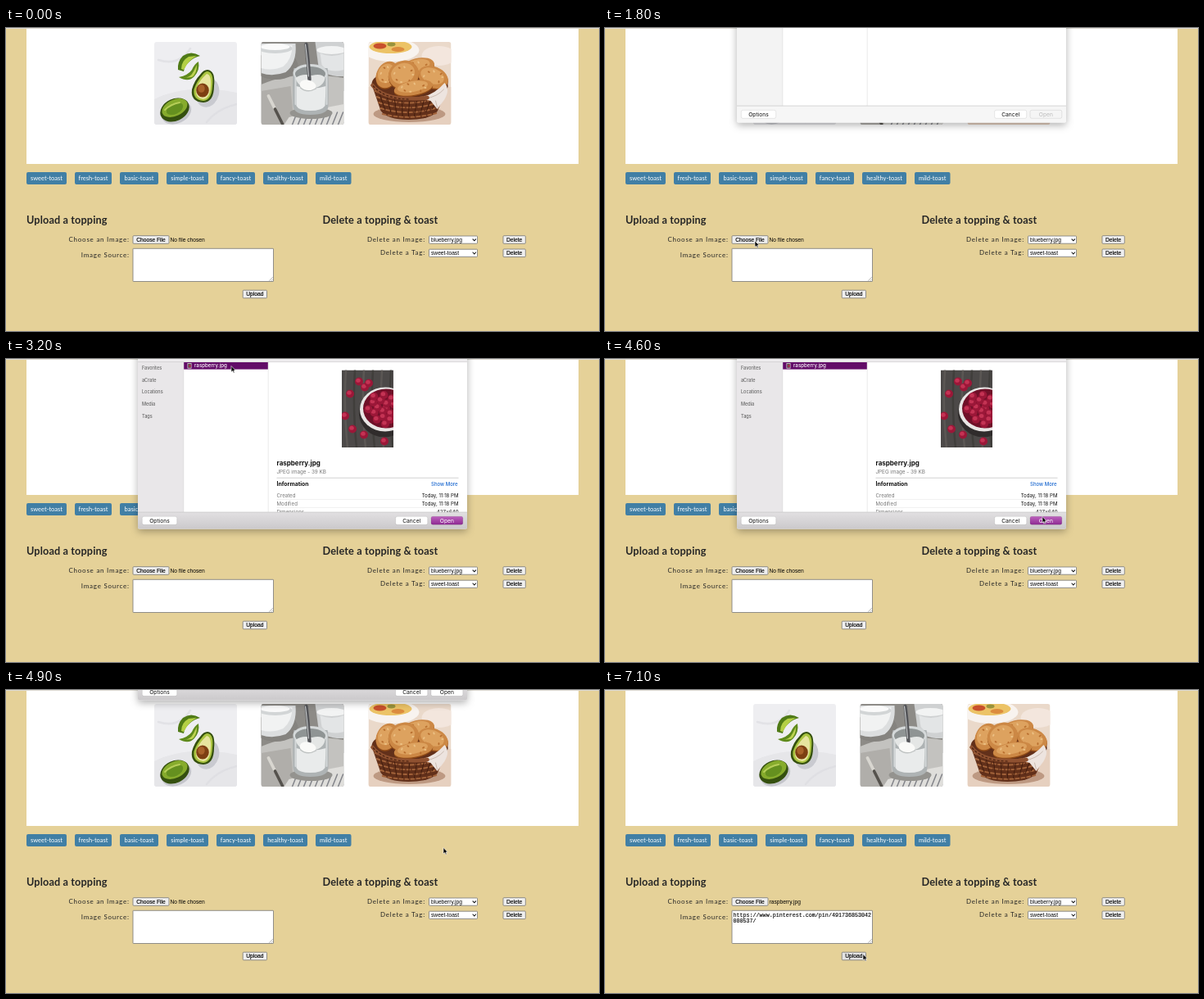
An HTML page that plays this animation: 724x370 px, repeating every 8 s.

```html
<!DOCTYPE html>
<html lang="en">
<head>
<meta charset="utf-8">
<title>Toast toppings</title>
<style>
  html, body { margin: 0; width: 100%; height: 100%; overflow: hidden; background: #e5d198; }
  svg { display: block; width: 724px; height: 370px; }
  text { white-space: pre; }
  .page { font-family: Lato, "Open Sans", sans-serif; fill: #262626; }
  .h { font-size: 12.7px; font-weight: 700; letter-spacing: .13px; }
  .label { font-size: 8px; letter-spacing: .75px; }
  .tag { font-size: 7.5px; fill: #fff; text-anchor: middle; }
  .ctl { font: 6.67px "Liberation Sans", Arial, sans-serif; fill: #000; }
  .btn { stroke: #000; stroke-width: .15px; }
  .mono { font: 6.7px "Liberation Mono", "Courier New", monospace; fill: #000; stroke: #000; stroke-width: .12px; }
  .mac { font-family: Inter, Roboto, sans-serif; font-size: 6.1px; fill: #111; }
  .grey { fill: #777; }
  .mid { text-anchor: middle; }
  .end { text-anchor: end; }
  #sheet { filter: drop-shadow(0 3px 5px rgba(0,0,0,.3)); }
</style>
</head>
<body>
<svg id="stage" viewBox="0 0 724 370" xmlns="http://www.w3.org/2000/svg"></svg>
<script>
const LOOP = 8000, STEP = 100;

const rect = (x, y, w, h, fill, extra = '') =>
  `<rect x="${x}" y="${y}" width="${w}" height="${h}" fill="${fill}" ${extra}/>`;
const text = (x, y, cls, str, extra = '') =>
  `<text x="${x}" y="${y}" class="${cls}" ${extra}>${str}</text>`;
const oval = (x, y, rx, ry, fill, turn = 0, extra = '') =>
  `<ellipse cx="${x}" cy="${y}" rx="${rx}" ry="${ry}" fill="${fill}" transform="rotate(${turn} ${x} ${y})" ${extra}/>`;
const path = (d, fill, extra = '') => `<path d="${d}" fill="${fill}" ${extra}/>`;
const line = (d, color, w = 1, extra = '') =>
  path(d, 'none', `stroke="${color}" stroke-width="${w}" stroke-linecap="round" ${extra}`);
const range = (n, f) => Array.from({ length: n }, (_, i) => f(i)).join('');

const button = (x, y, w, str, id = '') =>
  rect(x + .5, y + .5, w - 1, 9.6, '#efefef', `${id} rx="1" stroke="#767676" stroke-width=".8"`) +
  text(x + w / 2, y + 7.7, 'ctl btn mid', str);
const select = (y, str) =>
  rect(516.5, y, 59, 9.2, '#fff', 'rx=".8" stroke="#767676" stroke-width=".8"') +
  text(519, y + 7, 'ctl', str) +
  line(`M570 ${y + 3.8}l1.8 2l1.8 -2`, '#111', 1.1);
const photo = (x, bg, art) =>
  `<svg x="${x}" y="17" width="101" height="101" viewBox="0 0 101 101">
    <g clip-path="url(#frame)">${rect(0, 0, 101, 101, bg)}${art}</g></svg>`;

const avocado =
  path('M0 70Q40 50 101 62V101H0Z', '#e6e6e9') +
  line('M5 22Q30 30 44 8M64 98Q76 82 101 76', '#dadbe0', 2.5, 'opacity=".6"') +
  oval(65, 62, 14, 18, '#c9cad0', 16) +
  path('M29 34Q28 24 35 17Q45 10 56 17Q48 19 43 24Q37 29 36 36Z', '#4f7a16') +
  path('M33 33Q33 23 42 18L52 17Q42 22 36 34Z', '#b3cf45') +
  path('M30 43Q42 50 49 42Q56 34 54 24Q49 27 46 34Q41 41 30 43Z', '#5f8a1c') +
  path('M35 44Q44 44 48 36L52 28Q52 39 46 43Z', '#bdd350') +
  path('M65 34Q75 35 73 54Q73 73 60 74Q44 73 46 58Q49 47 56 40Q60 34 65 34Z', '#35500f') +
  path('M65 36Q73 37 71 54Q70 71 60 72Q47 71 48.5 58Q52 48 59 40Q62 36 65 36Z', '#aac440') +
  path('M64 39Q70 40 69 54Q68 69 60 70Q50 69 51 58Q54 49 60 43Z', '#e7e59f') +
  oval(59, 59, 7.8, 8.6, '#7d3f12') + oval(57.5, 57, 4.2, 4.8, '#a8622a') +
  oval(27, 86, 19, 13.5, '#c5c6cc', -25) +
  oval(25, 83, 18.5, 13.5, '#35500f', -25) +
  oval(25, 80.5, 16.5, 10, '#86ab2c', -25) +
  oval(25, 81.5, 11, 6.5, '#65901f', -25) +
  line('M13 83Q20 76 31 74', '#b6ce57', 2);

const yogurt =
  rect(0, 0, 101, 60, '#8d8b87') + path('M0 52Q40 34 101 44V101H0Z', '#c3c2bf') +
  path('M0 60L36 54L40 101H0Z', '#b0aeaa') +
  oval(18, 29, 27, 17, '#85837f') +
  path('M0 2H42Q44 26 30 37Q14 43 0 38Z', '#dcdedf') +
  path('M0 4H38Q38 21 27 30Q13 36 0 32Z', '#f1f2f2') + oval(17, 8, 21, 6, '#d2d5d6') + oval(17, 6, 18, 4, '#fafafa') +
  path('M66 0H101V42Q77 43 70 30Z', '#cfd1d2') + oval(86, 10, 18, 5, '#f2f3f3') +
  path('M72 14Q86 20 101 14V34Q82 39 74 28Z', '#e3e5e6') +
  path('M34 92L80 80L101 76V101H28Z', '#dfdedb') +
  range(10, i => line(`M${38 + i * 7} 101L${44 + i * 7} 86`, '#83848a', 1.5)) +
  oval(61, 87, 26, 7, '#94938f') +
  path('M40 32Q38 42 39 78Q40 89 60 89Q82 89 82 78Q83 42 81 32Z', '#aeb3b4') +
  path('M43 54Q60 60 79 54L78 78Q74 84 60 84Q46 84 43 78Z', '#e9ebeb') +
  line('M42 39V76M80 39V76', '#d4d8d9', 2) +
  oval(60, 38, 21, 11, '#d5d9da') + oval(60, 39, 18.5, 9, '#8f9494') +
  path('M42 44Q50 38 62 41Q74 38 78 44Q76 56 60 57Q45 56 42 44Z', '#e4e6e5') +
  line('M55 3Q57 18 59 46', '#55565a', 4.4) + line('M54 3Q56 18 58 42', '#c9cccd', 1.1) +
  oval(57, 53, 10, 6.5, '#fafaf8', 12) + line('M48 56Q56 63 67 57', '#bfc3c2', 1.4) +
  line('M9 66L17 82', '#d8d6d0', 3.8) + line('M17 82L26 100', '#55524d', 3.6);

const bread = (x, y, rx, ry, turn) =>
  oval(x, y + 1.5, rx, ry, '#8f4a17', turn) + oval(x, y, rx, ry, '#cc8845', turn) +
  oval(x - 1, y - 1.5, rx * .78, ry * .72, '#dda25f', turn) +
  range(8, i => oval(x + rx * .6 * Math.cos(i * 2.4), y + ry * .55 * Math.sin(i * 2.4), 1.6, 1, i % 2 ? '#b96f2f' : '#ecc084', i * 30));
const basket =
  rect(0, 55, 101, 46, '#e6d0bf') +
  oval(28, 10, 34, 14, '#f8f3ef') + oval(27, 6, 26, 8, '#ecc366') +
  oval(14, 5, 8, 3.5, '#c8502c') + oval(36, 9, 8, 3, '#dc8c3e') + oval(28, 3, 5, 2.4, '#98933c') +
  oval(86, 17, 21, 12, '#f3e6dd') +
  oval(50, 88, 44, 10, '#bd9982') +
  path('M4 52Q4 42 18 40L82 40Q98 43 97 55L84 85Q75 95 49 95Q23 95 15 84Z', '#62301a') +
  range(5, i => line(`M${8 + i * 2.3} ${60 + i * 7}Q50 ${78 + i * 4.5} ${92 - i * 2.3} ${59 + i * 7}`, '#a3633a', 1.9, 'stroke-dasharray="4 3"')) +
  range(9, i => line(`M${14 + i * 9} ${65 + 8 * Math.sin(i * .39)}L${20 + i * 7.2} ${82 + 9 * Math.sin(i * .39)}`, '#431d0e', 1)) +
  bread(60, 31, 21, 11, -14) + bread(23, 40, 13, 17, 28) + bread(79, 43, 19, 13, 22) +
  bread(43, 40, 19, 17, -25) + bread(55, 56, 24, 9, -10) +
  path('M63 68Q80 65 93 50Q100 58 93 70L84 82L76 72Z', '#ede4df') +
  line('M70 69Q84 67 92 58M82 72L84 80', '#cbbab0', 1) +
  line('M5 53Q17 69 50 69Q64 70 72 68', '#8f5130', 4.5) +
  line('M6 54Q20 70 51 70', '#4a2211', 1.2, 'stroke-dasharray="2 3"');

const berry = (x, y, r) => oval(x, y, r, r, '#9b1738') + oval(x - r * .2, y - r * .25, r * .55, r * .5, '#c43354');
const preview = `<svg x="410" y="13.5" width="63" height="94.5" viewBox="0 0 63 94.5">
  ${rect(0, 0, 63, 95, '#4c4948')}
  ${range(6, i => line(`M${5 + i * 11} 0Q${2 + i * 11} 45 ${7 + i * 11} 95`, i % 2 ? '#3b3937' : '#615d5a', 2.5, 'opacity=".7"'))}
  ${oval(52, 53, 31, 29, '#302c2c')}${oval(53, 48, 31, 27, '#e9e6e5')}${oval(54, 47, 28, 24, '#6f1028')}
  ${range(22, i => berry(54 + Math.sqrt(i) * 5.2 * Math.cos(i * 2.4), 47 + Math.sqrt(i) * 4.3 * Math.sin(i * 2.4), 5))}
  ${[[21, 14], [28, 21], [33, 16], [10, 29], [4, 56], [13, 72], [27, 79], [52, 87]].map(p => berry(...p, 5)).join('')}
</svg>`;

const tags = [['sweet', 25, 49], ['fresh', 84, 45], ['basic', 139, 47], ['simple', 196, 51],
  ['fancy', 257, 47], ['healthy', 314, 54], ['mild', 378, 43.5]];

const page = `<g class="page">
  ${rect(25, 0, 674, 166, '#fff')}
  ${rect(0, 0, 724, 1, '#dedbd3')}
  ${photo(181, '#eeeef1', avocado)}${photo(311.5, '#bdbdba', yogurt)}${photo(442.5, '#ead9ca', basket)}
  ${tags.map(([s, x, w]) => rect(x, 176, w, 15, '#417fa5', 'rx="2"') + text(x + w / 2, 186.2, 'tag', s + '-toast')).join('')}
  ${text(25, 238.5, 'h', 'Upload a topping')}
  ${text(386.5, 238.5, 'h', 'Delete a topping &amp; toast')}
  ${text(150.7, 261, 'label end', 'Choose an Image:')}
  ${text(150.7, 279.5, 'label end', 'Image Source:')}
  ${text(512, 261, 'label end', 'Delete an Image:')}
  ${text(512, 277.3, 'label end', 'Delete a Tag:')}
  ${button(154.5, 253.2, 45, 'Choose File')}
  ${text(200.5, 261, 'ctl', '', 'id="file"')}
  ${rect(155, 269.3, 171.5, 40.2, '#fff', 'id="area" rx=".5" stroke="#767676" stroke-width=".8"')}
  ${line('M321.5 308.5l4 -4M324 308.5l1.5 -1.5', '#888', .6)}
  ${rect(156.5, 271, .6, 7, '#000', 'id="caret"')}
  <g id="url">${text(156.5, 276.6, 'mono', 'https://www.pinterest.com/pin/491736853042')}
  ${text(156.5, 284.2, 'mono', '080537/')}</g>
  ${button(288.7, 319.7, 30.3, 'Upload', 'id="upload"')}
  ${select(254, 'blueberry.jpg')}${select(270.2, 'sweet-toast')}
  ${button(606.5, 253.2, 28.3, 'Delete')}${button(606.5, 269.5, 28.3, 'Delete')}
</g>`;

const sheetButton = (x, w, str, id = '') =>
  rect(x, 192.3, w, 10, '#fff', `${id && `id="${id}"`} rx="2" stroke="#00000026" stroke-width=".6"`) +
  text(x + w / 2, 199.6, 'mac mid', str, `style="font-size:6.7px" ${id && `id="${id}Text"`}`);
const info = (y, k, v) => text(330.5, y, 'mac grey', k) + text(552.5, y, 'mac end', v);

const sheet = `<g id="sheet">
  ${rect(161, -160, 402, 367.5, '#fff', 'rx="2"')}
  ${rect(161, -160, 56, 347, '#f3f3f3', 'id="side"')}
  ${rect(216.6, -160, .6, 347, '#d9d9d9')}${rect(319.8, -160, .6, 347, '#dcdcdc')}
  <g id="files">
    ${rect(161, -5, 402, 8.5, '#eeecee')}${rect(161, 3.2, 402, .6, '#c9c7c9')}
    ${['Favorites', 'aCrate', 'Locations', 'Media', 'Tags'].map((s, i) =>
      text(166, 13.2 + i * 14.6, 'mac', s, 'style="font-size:5.5px;font-weight:500;fill:#666"')).join('')}
    ${rect(217.2, 4, 102.6, 8.6, '#620b68', 'id="row"')}
    ${rect(221.5, 5, 5, 6.6, '#d9d4d4')}${rect(222.2, 5.8, 3.6, 5, '#54464a')}${oval(224.5, 8.5, 1.2, 1.4, '#b8244a')}
    ${text(230, 10.4, 'mac', 'raspberry.jpg', 'id="name" style="font-size:6.2px;font-weight:500"')}
  </g>
  <g id="detail" clip-path="url(#pane)">
    ${preview}
    ${text(330.5, 130, 'mac', 'raspberry.jpg', 'style="font-size:8px;font-weight:700"')}
    ${text(330.5, 140, 'mac grey', 'JPEG image - 39 KB', 'style="font-size:6.3px"')}
    ${rect(330.5, 144.8, 222, .7, '#bdbdbd')}
    ${text(330.5, 155.4, 'mac', 'Information', 'style="font-size:6.9px;font-weight:700"')}
    ${text(551.5, 155.2, 'mac end', 'Show More', 'style="font-size:6px;font-weight:500;fill:#1766cf"')}
    ${info(168.5, 'Created', 'Today, 11:18 PM')}${rect(330.5, 171.2, 222, .4, '#ddd')}
    ${info(178.5, 'Modified', 'Today, 11:18 PM')}${rect(330.5, 181.2, 222, .4, '#ddd')}
    ${info(188.5, 'Dimensions', '427×640')}
  </g>
  ${path('M161 187H563V205.5Q563 207.5 561 207.5H163Q161 207.5 161 205.5Z', '#f6f6f6', 'id="bar"')}
  ${rect(161, 186.7, 402, .7, '#c4c2c4')}
  ${sheetButton(166.3, 42.4, 'Options')}${sheetButton(475.7, 39, 'Cancel')}${sheetButton(519, 38.8, 'Open', 'open')}
</g>`;

document.getElementById('stage').innerHTML = `<defs>
  <clipPath id="frame"><rect width="101" height="101" rx="3"/></clipPath>
  <clipPath id="pane"><rect x="320" y="0" width="243" height="187"/></clipPath>
  <linearGradient id="grey" x2="0" y2="1"><stop stop-color="#e2e0e2"/><stop offset="1" stop-color="#cbc9cb"/></linearGradient>
  <linearGradient id="plum" x2="0" y2="1"><stop stop-color="#bd62bd"/><stop offset="1" stop-color="#8d2a92"/></linearGradient>
</defs>${page}${sheet}
<g id="cursor">
  ${path('M0 0V7.4L1.8 5.9L2.9 8.5L4.1 8L3 5.4H5.2Z', '#000', 'id="arrow" stroke="#fff" stroke-width=".6"')}
  ${line('M-1.5 -3.8Q0 -3.8 0 -2.8Q0 -3.8 1.5 -3.8M0 -2.8V2.8M-1.5 3.8Q0 3.8 0 2.8Q0 3.8 1.5 3.8', '#111', .9, 'id="beam"')}
</g>`;

const $ = Object.fromEntries([...document.querySelectorAll('[id]')].map(e => [e.id, e]));
const show = (el, on) => { el.style.display = on ? '' : 'none'; };

// time, x, y of the pointer
const moves = [[100, 617, 352], [950, 322, 306], [1500, 183, 260], [2000, 183, 260], [2700, 275, 8.5],
  [3300, 275, 8.5], [4400, 534, 192.5], [4950, 534, 192.5], [5700, 281, 284], [6200, 281, 284], [7100, 315, 322.5]];
// time, vertical offset of the sheet
const slide = [[0, null], [1700, -168], [1800, -92], [1900, 0], [4800, -88], [4900, -195], [5000, null]];

function pointer(t) {
  const i = moves.findIndex(m => m[0] >= t);
  if (i < 0) return moves[moves.length - 1].slice(1);
  if (i === 0) return moves[0].slice(1);
  const [t0, x0, y0] = moves[i - 1], [t1, x1, y1] = moves[i];
  const p = (t - t0) / (t1 - t0), e = p * p * (3 - 2 * p);
  return [x0 + (x1 - x0) * e, y0 + (y1 - y0) * e];
}

function draw(t) {
  const dy = slide.filter(s => s[0] <= t).pop()[1];
  const listed = t >= 2100, picked = t >= 2800, ready = picked && t < 4800;
  show($.sheet, dy !== null);
  $.sheet.setAttribute('transform', `translate(0 ${dy || 0})`);
  show($.files, listed);
  show($.detail, picked);
  show($.row, picked);
  $.name.style.fill = picked ? '#fff' : '#222';
  $.side.setAttribute('fill', listed ? '#e9e7e9' : '#f3f3f3');
  $.bar.setAttribute('fill', listed ? 'url(#grey)' : '#f6f6f6');
  $.open.setAttribute('fill', ready ? 'url(#plum)' : picked ? '#fff' : '#f5f5f5');
  $.openText.style.fill = ready ? '#fff' : picked ? '#111' : '#bbb';

  const focus = t >= 5600 && t < 7100, pasted = t >= 6000;
  $.file.textContent = t >= 5000 ? 'raspberry.jpg' : 'No file chosen';
  $.area.setAttribute('stroke', focus ? '#9a45b4' : '#767676');
  $.area.setAttribute('stroke-width', focus ? 1.3 : .8);
  $.area.setAttribute('rx', focus ? 1 : .5);
  show($.caret, focus && !pasted);
  show($.url, pasted);
  $.upload.setAttribute('fill', t >= 7100 ? '#e3e3e3' : '#efefef');

  const [x, y] = pointer(t);
  const typing = x > 155 && x < 327 && y > 269 && y < 310;
  show($.cursor, t >= 100);
  $.cursor.setAttribute('transform', `translate(${x} ${y})`);
  show($.arrow, !typing);
  show($.beam, typing);
}

const start = performance.now();
function tick() {
  const t = (performance.now() - start) % LOOP;
  draw(Math.floor(t / STEP) * STEP);
  requestAnimationFrame(tick);
}
tick();
</script>
</body>
</html>
```
